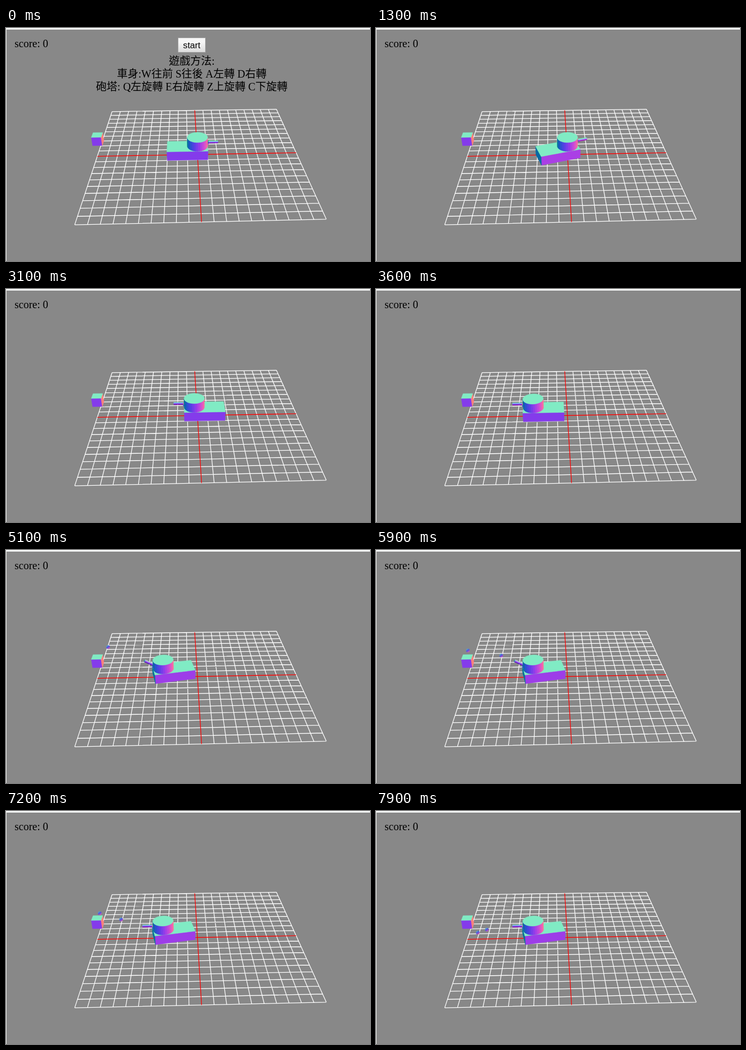
Animation, 680 px wide and 437 px high, one loop 8000 ms. Source, as an HTML page:

```html
<!DOCTYPE html>
<html lang="zh-Hant">
<head>
<meta charset="utf-8">
<style>
  html, body { margin: 0; width: 100%; height: 100%; overflow: hidden; background: #f3f5f4; }
  svg { display: block; width: 680px; height: 437px; }
  text { font: 20px "Liberation Serif", "Noto Sans CJK TC", "Noto Sans CJK", serif; fill: #000; }
  .mid { text-anchor: middle; }
  .label { font: 16.67px "Liberation Sans", sans-serif; }
</style>
</head>
<body>
<svg viewBox="0 0 680 437">
  <defs>
    <linearGradient id="ball" x1="0.1" y1="0" x2="0.8" y2="1">
      <stop offset="0.1" stop-color="#4fb4c8"/>
      <stop offset="0.5" stop-color="#5552dc"/>
      <stop offset="1" stop-color="#e25cb4"/>
    </linearGradient>
    <linearGradient id="up" x2="0" y2="1">
      <stop offset="0.3" stop-color="#f6f6f6"/>
      <stop offset="1" stop-color="#dcdcdc"/>
    </linearGradient>
    <linearGradient id="down" x2="0" y2="1">
      <stop offset="0.3" stop-color="#e6e6e6"/>
      <stop offset="1" stop-color="#f0f0f0"/>
    </linearGradient>
  </defs>
  <rect x="1" y="3" width="679" height="434" fill="#888"/>
  <g id="grid" fill="none" stroke-width="1.3"></g>
  <g id="scene" stroke-width="0.5"></g>
  <text x="16" y="36">score: 0</text>
  <g id="menu">
    <rect id="button" x="321.5" y="18.5" width="51" height="27" stroke="#a6a6a6"/>
    <text class="mid label" x="347" y="38">start</text>
    <text class="mid" x="347" y="68.5">遊戲方法:</text>
    <text class="mid" x="347" y="92.5">車身:W往前 S往後 A左轉 D右轉</text>
    <text class="mid" x="347" y="116.5">砲塔: Q左旋轉 E右旋轉 Z上旋轉 C下旋轉</text>
  </g>
</svg>
<script>
const $ = id => document.getElementById(id);
const { sin, cos, PI, floor, max, min } = Math;

// Camera: orbit angle, tilt, distance and focal length
const SY = sin(0.033), CY = cos(0.033), ST = 0.5387, CT = 0.8425;
const DIST = 40.1, FOCAL = 745;

// World (x, y up, z near) to camera axes (right, down, away)
const view = ([x, y, z]) => [
  x * CY + z * SY,
  (z * CY - x * SY) * ST - y * CT,
  (x * SY - z * CY) * CT - y * ST
];

function project(p) {
  const [x, y, z] = view(p), k = FOCAL / (DIST + z);
  return [357.6 + x * k, 237.2 + y * k];
}

const path = pts => 'M' + pts.map(p => project(p).map(v => v.toFixed(2))).join('L');
const move = (p, ...steps) =>
  steps.reduce((q, [k, v]) => q.map((c, i) => c + k * v[i]), p);
const neg = v => v.map(c => -c);
const UP = [0, 1, 0];

// Flat face coloured by its normal as the camera sees it
function face(pts, normal) {
  const n = view(normal), p = view(pts[0]);
  if (n[0] * p[0] + n[1] * p[1] + n[2] * (p[2] + DIST) >= 0) return '';
  const rgb = [n[0], -n[1], -n[2]].map(c => Math.round(127.5 + 127.5 * c));
  const c = `rgb(${rgb})`;
  return `<path d="${path(pts)}Z" fill="${c}" stroke="${c}"/>`;
}

const heading = a => [[cos(a), 0, -sin(a)], [sin(a), 0, cos(a)]];

function box(base, a, back, front, half, height) {
  const [f, s] = heading(a);
  const at = (l, w, h) => move(base, [l, f], [w * half, s], [h, UP]);
  const flank = w =>
    face([at(back, w, 0), at(front, w, 0), at(front, w, height), at(back, w, height)],
      w > 0 ? s : neg(s));
  const end = (l, n) =>
    face([at(l, -1, 0), at(l, 1, 0), at(l, 1, height), at(l, -1, height)], n);
  const lid = face([at(back, -1, height), at(front, -1, height),
    at(front, 1, height), at(back, 1, height)], UP);
  return flank(-1) + flank(1) + end(back, neg(f)) + end(front, f) + lid;
}

// Cylinder from p to q; u and v span its cross-section
function tube(p, q, axis, u, v, r, n) {
  const rim = (c, i) => move(c, [r * cos(i * 2 * PI / n), u], [r * sin(i * 2 * PI / n), v]);
  const top = [], bottom = [];
  let out = '';
  for (let i = 0; i < n; i++) {
    const m = (i + 0.5) * 2 * PI / n;
    out += face([rim(p, i), rim(p, i + 1), rim(q, i + 1), rim(q, i)],
      move([0, 0, 0], [cos(m), u], [sin(m), v]));
    top.push(rim(q, i));
    bottom.push(rim(p, i));
  }
  return out + face(bottom, neg(axis)) + face(top, axis);
}

function ball(p, r) {
  const [x, y] = project(p);
  return `<circle cx="${x.toFixed(2)}" cy="${y.toFixed(2)}" r="${r}" fill="url(#ball)"/>`;
}

function gun(pivot, a, pitch) {
  const [f, s] = heading(a);
  const axis = move([0, 0, 0], [cos(pitch), f], [sin(pitch), UP]);
  const lift = move([0, 0, 0], [-sin(pitch), f], [cos(pitch), UP]);
  const joint = move(pivot, [0.97, f], [1.25, UP]);
  const rear = move(joint, [0.1, axis], [0.2, lift]);
  const tip = move(joint, [1.05, axis], [0.2, lift]);
  return ball(joint, 3) + tube(rear, tip, axis, s, lift, 0.12, 12);
}

function tank(x, a, turn, pitch) {
  const base = [x, 0, 0], barrel = gun(base, a + turn, pitch);
  const turret = tube([x, 1, 0], [x, 2, 0], UP, [1, 0, 0], [0, 0, 1], 1, 32);
  const nearSide = -sin(a + turn) > 0.25;
  return box(base, a, -3, 1, 1, 1) + (nearSide ? turret + barrel : barrel + turret);
}

// Firing time and initial slope
const SHOTS = [
  [4706, 0.7], [5150, 0.7], [5400, 0.6], [5750, 0.55], [6143, 0.55], [6319, 0.55],
  [6720, 0.55], [6950, 0.35], [7250, 0], [7509, 0], [7612, 0]
];

function shot(t, [start, slope]) {
  const d = (t - start) * 0.009;
  const x = -5.35 + 0.55 * slope - d;
  if (d < 0 || x < -10.5) return '';
  const y = 1.45 + 0.88 * slope + slope * d - 0.055 * (1 + slope * slope) * d * d;
  return ball([x, y, 0], 3.5);
}

function drawGrid() {
  let white = '', red = '';
  for (let i = -10; i <= 10; i++) {
    const d = path([[i, 0, -10], [i, 0, 10]]) + path([[-10, 0, i], [10, 0, i]]);
    if (i) white += d; else red = d;
  }
  $('grid').innerHTML = `<path d="${white}" stroke="#fff"/><path d="${red}" stroke="#f00"/>`;
}

const TARGET = box([-10.35, 0, -2.56], 0, -0.5, 0.5, 0.5, 1);
const RAD = PI / 180;

function draw(t) {
  const steps = (from, n) => max(0, min(n, floor((t - from) / 100) + 1));
  const drive = steps(3100, 6);
  const x = drive ? 0.3 - 0.61 * drive : 0;
  const a = 17.5 * steps(1300, 9) + 11.25 * steps(2500, 2) + 11.3 * steps(4400, 1);
  const turn = -5.65 * steps(3900, 2);
  const pitch = 0.1 * (steps(4500, 5) - steps(6800, 5));
  $('scene').innerHTML = TARGET + SHOTS.map(s => shot(t, s)).join('') +
    tank(x, a * RAD, turn * RAD, pitch);
  $('menu').style.display = t < 1000 ? '' : 'none';
  $('button').setAttribute('fill', t < 700 ? 'url(#up)' : 'url(#down)');
}

let last = -1;
function tick() {
  const t = floor(performance.now() % 8000 / 100) * 100;
  if (t !== last) draw(last = t);
  requestAnimationFrame(tick);
}

drawGrid();
tick();
</script>
</body>
</html>
```
